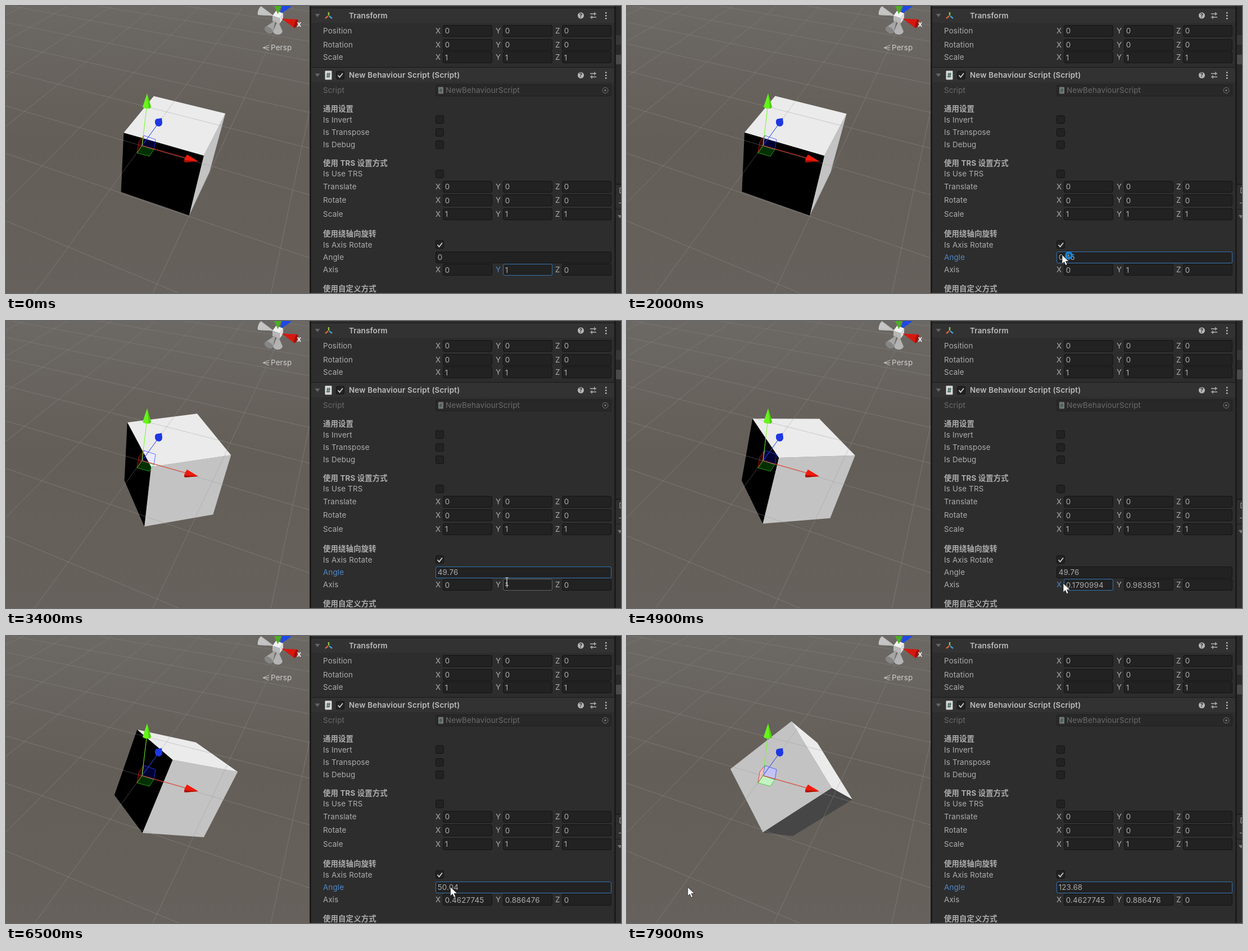
Write an HTML page that moves like this. It is 1094 by 512 pixels and loops after 8000 ms.

```html
<!DOCTYPE html>
<html lang="en">
<head>
<meta charset="utf-8">
<title>Axis rotation</title>
<style>
html, body { margin: 0; width: 100%; height: 100%; overflow: hidden; background: #2d2d2d; }
svg { display: block; }
text { font: 13.4px Inter, "Noto Sans CJK SC", "Noto Sans CJK", sans-serif; letter-spacing: .15px; fill: #adadad; white-space: pre; }
.bold { font-weight: 600; fill: #bdbdbd; letter-spacing: .2px; }
.cjk { font-weight: 700; fill: #adadad; }
.dim { fill: #6c6c6c; }
.field { fill: #222; stroke: #141414; }
.field.hover { stroke: #606060; }
.field.focus { stroke: #3273b2; }
text.focus { fill: #5088c8; }
.glow { mix-blend-mode: plus-lighter; }
</style>
</head>
<body>
<svg id="stage" width="1094" height="512" viewBox="0 0 1094 512"></svg>
<script>
const DURATION = 8000, TICK = 100, WIDTH = 1094;
const rad = d => d * Math.PI / 180;
const dot = (a, b) => a[0] * b[0] + a[1] * b[1] + a[2] * b[2];

// Camera, in units of the cube's side with the cube's centre at zero
const yaw = rad(26.9), pitch = rad(45.6), focal = 645, center = [175.8, 354.8];
const right = [Math.cos(yaw), 0, Math.sin(yaw)];
const up = [-Math.sin(yaw) * Math.sin(pitch), Math.cos(pitch), Math.cos(yaw) * Math.sin(pitch)];
const ahead = [-Math.sin(yaw) * Math.cos(pitch), -Math.sin(pitch), Math.cos(yaw) * Math.cos(pitch)];
const offset = [.902, .69, 4.939];
const camera = [0, 1, 2].map(i => -(right[i] * offset[0] + up[i] * offset[1] + ahead[i] * offset[2]));
const depth = p => offset[2] + dot(ahead, p);
const project = p => [
  center[0] + focal * (offset[0] + dot(right, p)) / depth(p),
  center[1] - focal * (offset[1] + dot(up, p)) / depth(p)
].map(n => +n.toFixed(2));

function rotate(v, k, angle) {
  const c = Math.cos(angle), s = Math.sin(angle), d = dot(k, v) * (1 - c);
  const cross = [k[1] * v[2] - k[2] * v[1], k[2] * v[0] - k[0] * v[2], k[0] * v[1] - k[1] * v[0]];
  return v.map((n, i) => n * c + cross[i] * s + k[i] * d);
}

// Corners of the unit cube's face on one side of an axis
const faceCorners = (k, sign) => [[-.5, -.5], [.5, -.5], [.5, .5], [-.5, .5]].map(([a, b]) => {
  const v = [0, 0, 0];
  v[k] = sign / 2; v[(k + 1) % 3] = a; v[(k + 2) % 3] = b;
  return v;
});
const unit = (k, sign) => [0, 1, 2].map(i => i === k ? sign : 0);
const polygon = (points, color) => `<polygon points="${points.join(' ')}" fill="${color}"/>`;

const faces = [
  [0, 1, '#c3c3c3'], [0, -1, '#000'], [1, 1, '#ebebeb'],
  [1, -1, '#000'], [2, 1, '#464646'], [2, -1, '#000']
];
const drawCube = (axis, angle) => faces.map(([k, sign, color]) => {
  if (dot(rotate(unit(k, sign), axis, angle), camera) <= .5) return '';
  return polygon(faceCorners(k, sign).map(v => project(rotate(v, axis, angle))), color);
}).join('');

function drawGrid() {
  const origin = -.43, near = .3;
  let d = '';
  const line = (a, b) => {
    const da = depth(a), db = depth(b);
    if (da < near && db < near) return;
    const cut = (p, q, dp, dq) => dp >= near ? p : p.map((n, i) => n + (q[i] - n) * (near - dp) / (dq - dp));
    d += `M${project(cut(a, b, da, db))}L${project(cut(b, a, db, da))}`;
  };
  for (let i = -16; i <= 16; i++) {
    line([origin + i, 0, -6], [origin + i, 0, 24]);
    line([origin - 16, 0, i], [origin + 16, 0, i]);
  }
  return `<path d="${d}" fill="none" stroke="url(#gridFade)"/>`;
}

// Orientation gizmo: six cones pointing at a small cube, seen by the same camera without perspective
function drawViewGizmo() {
  const flat = v => [483.5 + dot(right, v), 20 - dot(up, v)].map(n => +n.toFixed(2));
  const cone = (k, sign, color, baseColor) => {
    const dir = unit(k, sign), far = dot(ahead, dir);
    const rim = Array.from({ length: 24 }, (_, i) => {
      const v = dir.map(n => n * 36);
      v[(k + 1) % 3] = 8 * Math.cos(i * Math.PI / 12);
      v[(k + 2) % 3] = 8 * Math.sin(i * Math.PI / 12);
      return flat(v);
    });
    const tip = flat(dir.map(n => n * 8));
    const sides = rim.map((p, i) => polygon([tip, p, rim[(i + 1) % 24]], color)).join('');
    return sides + polygon(rim, far < 0 ? baseColor : color);
  };
  const block = (k, sign, color) => polygon(faceCorners(k, sign).map(v => flat(v.map(n => n * 14))), color);
  return cone(0, -1, '#c6c6c6') + cone(1, -1, '#b4b4b4') + cone(2, 1, '#1d49e8') +
    block(0, 1, '#dcdcdc') + block(1, 1, '#f0f0f0') + block(2, -1, '#b8b8b8') +
    cone(0, 1, '#d8180e', '#a30e08') + cone(1, 1, '#4fb024', '#3f9a1c') + cone(2, -1, '#a8a8a8', '#858585') +
    `<text x="517.5" y="37" style="font-weight:700;fill:#eee">x</text>
    <path d="M468 70l-11 4.5 11 4.5M457 74.5h11" fill="none" stroke="#c8c8c8"/>
    <text x="471" y="79" style="fill:#cfcfcf">Persp</text>`;
}

// Inspector
const label = (x, y, s, cls = '', id = '') => `<text x="${x}" y="${Math.round(y + 4.8)}" class="${cls}" id="${id}">${s}</text>`;
const box = (x, y, w, id = '', h = 20) =>
  `<rect x="${x + .5}" y="${Math.floor(y - h / 2 - .5) + .5}" width="${w}" height="${h}" rx="2.5" class="field" id="${id}"/>`;
const vector = (y, name, values, id) => label(564, y, name) + ['X', 'Y', 'Z'].map((c, i) => {
  const x = [764, 871, 977][i], fx = [777, 884, 989][i], key = id ? id + c : '';
  return label(x, y, c, '', key && key + 'Label') + box(fx, y + .5, 87, key && key + 'Box') +
    label(fx + 3.7, y + .5, values[i], '', key && key + 'Text');
}).join('');
const tick = (x, y) => `<path d="M${x - 4} ${y}l3 3.5 5.5-7" fill="none" stroke="#d0d0d0" stroke-width="1.8"/>`;
const toggle = (y, name, on) => label(564, y, name) + box(764, y, 14, '', 14) + (on ? tick(771.5, y) : '');
const header = (y, title, icon) => `
  <path d="M543 ${Math.floor(y - 13) - .5}H1082" stroke="#1a1a1a"/><rect x="543" y="${Math.floor(y - 13)}" width="539" height="26" fill="#323232"/>
  <path d="M549.5 ${y - 3}h9l-4.5 6z" fill="#656565"/>${icon}${label(610, y, title, 'bold')}
  <circle cx="1022.5" cy="${y}" r="5.5" fill="#b8b8b8"/>
  <text x="1019.5" y="${y + 3.6}" style="font-size:10px;font-weight:700;fill:#323232">?</text>
  <path d="M1039 ${y - 3}h11M1039 ${y + 3}h11M1047 ${y - 6}v6M1042 ${y}v6" stroke="#b8b8b8" stroke-width="1.3"/>
  <path d="M1066 ${y - 6}h2.5v2.5h-2.5zM1066 ${y - 1}h2.5v2.5h-2.5zM1066 ${y + 4}h2.5v2.5h-2.5z" fill="#b8b8b8"/>`;
const sheet = (x, y, h, color) => `<rect x="${x}" y="${y - h / 2}" width="${h * .75}" height="${h}" rx="1" fill="${color}"/>
  <text x="${x + h * .14}" y="${y + h * .27}" style="font-size:${h * .7}px;font-weight:700;fill:#2e5b45">#</text>`;
const axesIcon = `<g fill="none" stroke-width="2.5"><path d="M574 17v-6" stroke="#8ac43f"/>
  <path d="M573 18l-5 4" stroke="#e0633a"/><path d="M575 18l5 4" stroke="#3f9fd8"/></g>`;

const inspector = `
  <rect x="540" width="554" height="512" fill="#2d2d2d"/><rect x="540" width="3" height="512" fill="#1b1b1b"/>
  ${header(17, 'Transform', axesIcon)}
  ${vector(44, 'Position', [0, 0, 0])}${vector(69, 'Rotation', [0, 0, 0])}${vector(91.5, 'Scale', [1, 1, 1])}
  ${header(123.5, 'New Behaviour Script (Script)', sheet(567.5, 123.5, 16, '#d8d8d8') + box(587, 123.5, 14, '', 14) + tick(594.5, 123.5))}
  ${label(564, 150.5, 'Script', 'dim')}
  <rect x="764.5" y="140.5" width="312" height="20" rx="2.5" fill="#282828" stroke="#202020"/>
  ${sheet(769, 150.5, 12, '#777')}${label(782, 150.5, 'NewBehaviourScript', 'dim')}
  <circle cx="1066" cy="150.5" r="5" fill="none" stroke="#777"/><circle cx="1066" cy="150.5" r="1.8" fill="#777"/>
  ${label(564, 183, '通用设置', 'cjk')}
  ${toggle(203, 'Is Invert')}${toggle(225.5, 'Is Transpose')}${toggle(247.5, 'Is Debug')}
  ${label(564, 280, '使用 TRS 设置方式', 'cjk')}${toggle(299.5, 'Is Use TRS')}
  ${vector(322, 'Translate', [0, 0, 0])}${vector(346.5, 'Rotate', [0, 0, 0])}${vector(371, 'Scale', [1, 1, 1])}
  ${label(564, 406, '使用绕轴向旋转', 'cjk')}${toggle(426, 'Is Axis Rotate', true)}
  ${label(564, 448.5, 'Angle', '', 'angleLabel')}${box(764, 448.5, 312, 'angleBox')}${label(767.7, 448.5, '0', '', 'angleText')}
  ${vector(470.5, 'Axis', [0, 1, 0], 'axis')}
  ${label(564, 504.5, '使用自定义方式', 'cjk')}
  <rect x="1082" width="12" height="512" fill="#1b1b1b"/><rect x="1085" width="9" height="317" fill="#292929"/>
  <rect x="1085" y="52" width="9" height="17" fill="#373737"/><rect x="1085" y="87" width="9" height="17" fill="#4a4a4a"/>
  <rect x="1085" y="319" width="9" height="193" fill="#2f2f2f"/><path d="M1085 362.5h9" stroke="#1b1b1b"/>
  <path d="M1094 324.5h-2v9h2M1090 351.5h4" fill="none" stroke="#b0b0b0"/><path d="M1088 373h8l-4 6z" fill="#777"/>`;

const planeHandle = (d, glow, stroke) => `<path d="${d}" class="glow" fill="${glow}"/><path d="${d}" fill="none" stroke="${stroke}" stroke-opacity=".75"/>`;
const moveHandle = `
  ${planeHandle('M242 249l3-18-9 12-3 19z', '#300000', '#d02018')}
  ${planeHandle('M242 249l3-18 21 7-3 18z', '#000034', '#2c44f0')}
  ${planeHandle('M242 249l21 7-8 12-22-6z', '#003000', '#38c020')}
  <path d="M242 249L269 212" stroke="#1c42f0"/><path d="M242 249L250 182" stroke="#70ff20"/>
  <path d="M242 249L320 271" stroke="#f03020"/>
  <path d="M251 156L258 180q-1 3-7 3t-8-3z" fill="#66f41c"/><path d="M251 156L258 180q-1 3-4 3z" fill="#50d010"/>
  <path d="M342 277l-24 2q-2-3 0-7t4-7z" fill="#ef1a0c"/><path d="M342 277l-24 2q-1-2-1-4z" fill="#a80c04"/>
  <path d="M265 205q1-4 5-4l7-1 1 8q0 6-6 7-8-1-7-10z" fill="#1d37e2"/>`;

document.getElementById('stage').innerHTML = `
  <defs>
  <linearGradient id="ground" x2="0" y2="1"><stop stop-color="#6c6864"/><stop offset=".46" stop-color="#645e58"/><stop offset="1" stop-color="#66615c"/></linearGradient>
  <linearGradient id="gridFade" gradientUnits="userSpaceOnUse" x1="0" y1="0" x2="0" y2="512">
  <stop stop-color="#969696" stop-opacity=".28"/><stop offset=".4" stop-color="#969696" stop-opacity=".42"/><stop offset="1" stop-color="#969696" stop-opacity=".4"/></linearGradient>
  <clipPath id="view"><rect width="540" height="512"/></clipPath>
  </defs>
  <g clip-path="url(#view)"><rect width="540" height="512" fill="url(#ground)"/><g id="cube"></g>${drawGrid()}${moveHandle}${drawViewGizmo()}</g>
  ${inspector}
  <g id="pointer">
  <g id="arrow"><circle id="busy" cx="12" cy="1" r="5" fill="none" stroke="#1683d6" stroke-width="4"/>
  <path d="M0 0V16l3.7-3.5 2.6 6 2.8-1.2-2.6-5.8H12z" fill="#fff" stroke="#222" stroke-width=".8"/></g>
  <path id="beam" d="M-3-7H3M0-7V7M-3 7H3" fill="none" stroke="#ddd" stroke-width="1.2"/>
  </g>`;

// Tracks: [ms, values...]; pointer x beyond the right edge wraps to the left
const angleTrack = [[1800, 0], [2000, .45], [2300, 3], [2900, 22], [3000, 30], [3100, 40], [3200, 47], [3300, 49.76],
  [6300, 49.76], [6900, 50.6], [7200, 54.14], [7600, 79.7], [7700, 94], [7800, 108.6], [7900, 123.68]];
const axisTrack = [[4600, 0], [4900, .1790994], [5400, .4431206], [5700, .4627745]];
const pointerTrack = [[100, 690, 530], [200, 686, 500], [300, 675, 470], [400, 666, 452], [600, 666, 452], [1000, 575, 450],
  [1400, 650, 452], [1800, 759, 447], [2000, 774, 444], [2900, 1048, 444], [3000, 1150, 444], [3100, 1160, 444],
  [3200, 1093, 444], [3300, 985, 450], [3400, 891, 465], [3600, 891, 465], [3900, 810, 478], [4400, 770, 468],
  [4600, 770, 468], [4900, 776, 468], [5700, 786, 466], [5900, 786, 466], [6300, 750, 448], [7200, 933, 447],
  [7600, 1045, 448], [7700, 1104, 448], [7800, 1154, 448], [7900, 1202, 448]];
const focusTrack = [[0, 'axisY'], [600, ''], [1600, 'angle'], [4400, 'axisX'], [6300, 'angle']];

function sample(track, t) {
  const i = track.findIndex(k => k[0] > t);
  if (i === 0) return track[0].slice(1);
  if (i < 0) return track.at(-1).slice(1);
  const a = track[i - 1], b = track[i], p = (t - a[0]) / (b[0] - a[0]);
  return a.slice(1).map((n, j) => n + (b[j + 1] - n) * p);
}

const $ = id => document.getElementById(id);
const show = (id, on) => $(id).setAttribute('visibility', on ? 'visible' : 'hidden');
const rounded = (n, digits) => String(+n.toFixed(digits));

function render(t) {
  const [angle] = sample(angleTrack, t), [x] = sample(axisTrack, t), y = Math.sqrt(1 - x * x);
  $('cube').innerHTML = drawCube([x, y, 0], rad(angle));
  $('angleText').textContent = rounded(angle, 2);
  $('axisXText').textContent = rounded(x, 7);
  $('axisYText').textContent = rounded(y, 6);

  const focus = focusTrack.findLast(k => k[0] <= t)[1];
  for (const id of ['angle', 'axisX', 'axisY']) {
    $(id + 'Label').classList.toggle('focus', id === focus);
    $(id + 'Box').classList.toggle('focus', id === focus);
  }
  const beam = t >= 3400 && t < 3700;
  $('axisYBox').classList.toggle('hover', beam);

  const [px, py] = sample(pointerTrack, t);
  $('pointer').setAttribute('transform', `translate(${px % WIDTH} ${py})`);
  show('beam', beam);
  show('arrow', !beam);
  show('busy', t >= 1900 && t <= 2100);
}

let last = -1;
const start = performance.now();
function loop() {
  const t = Math.floor((performance.now() - start) % DURATION / TICK) * TICK;
  if (t !== last) render(last = t);
  requestAnimationFrame(loop);
}
loop();
</script>
</body>
</html>
```
